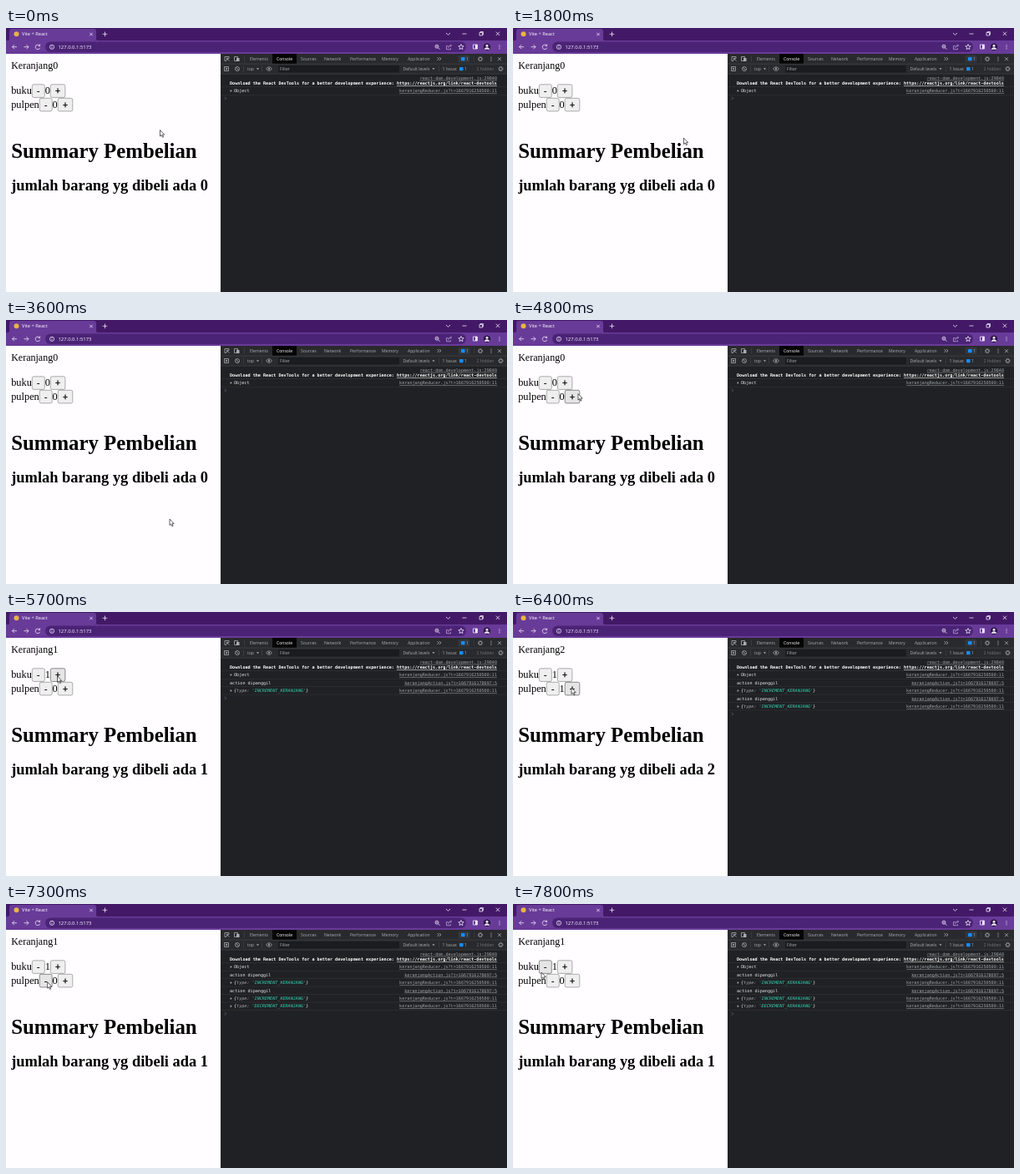
Write an HTML page that moves like this. It is 600 px wide and 317 px high and loops after 8 s.

```html
<!DOCTYPE html>
<html lang="id">
<head>
<meta charset="utf-8">
<title>Vite + React</title>
<style>
  html, body { margin: 0; width: 100%; height: 100%; overflow: hidden; }
  svg { display: block; width: 600px; height: 317px; }
  text { white-space: pre; }
  .ui { font-family: "Open Sans", sans-serif; }
  .page { font-family: "Liberation Serif", serif; fill: #000; }
  .mono { font: 5.12px "DejaVu Sans Mono", monospace; fill: #e8e9eb; }
  .mono.bold { font-weight: 700; fill: #fff; }
  .mono.link { fill: #9fa4a9; text-decoration: underline; text-anchor: end; }
  .key { fill: #a3a8ad; }
  .string { fill: #35d4b4; }
  .icon { fill: none; stroke-width: .8; }
  .button rect { fill: #efefef; stroke: #8c8c8c; stroke-width: .7; }
  .button.hover rect { fill: #e5e5e5; stroke: #5c5c5c; }
  .button text { font: 10.3px "Liberation Sans", sans-serif; text-anchor: middle; stroke: #000; stroke-width: .3; }
</style>
</head>
<body>
<svg id="stage" viewBox="0 0 600 317"></svg>
<script>
const LOOP = 8000;
const INCREMENT_BUKU = 5700, INCREMENT_PULPEN = 6400, DECREMENT_PULPEN = 7200;
const stage = document.getElementById('stage');

const rect = (x, y, w, h, fill, r = 0) =>
  `<rect x="${x}" y="${y}" width="${w}" height="${h}" rx="${r}" fill="${fill}"/>`;
const circle = (x, y, r, fill) => `<circle cx="${x}" cy="${y}" r="${r}" fill="${fill}"/>`;
const icon = (d, color) => `<path class="icon" d="${d}" stroke="${color}"/>`;
const ring = (x, y, r) => `M${x - r} ${y}a${r} ${r} 0 1 0 ${2 * r} 0a${r} ${r} 0 1 0 ${-2 * r} 0`;
const cross = (x, y, r) => `M${x - r} ${y - r}l${2 * r} ${2 * r}m0 ${-2 * r}l${-2 * r} ${2 * r}`;
const box = (x, y, w, h) => `M${x} ${y}h${w}v${h}h${-w}z`;
const label = (x, y, text, size = 5.1, fill = '#a9adb2') =>
  `<text class="ui" x="${x}" y="${y}" font-size="${size}" fill="${fill}">${text}</text>`;
const mono = (x, y, text, cls = '') => `<text class="mono ${cls}" x="${x}" y="${y}">${text}</text>`;
const page = (y, size, text, id = '', weight = 400, x = 6.2) =>
  `<text class="page" id="${id}" x="${x}" y="${y}" font-size="${size}" font-weight="${weight}">${text}</text>`;
const dots = (x, y, fill) => [-2, 0, 2].map(d => circle(x, y + d, .6, fill)).join('');
const caret = (x, y) => `<path d="M${x} ${y}h3l-1.5 2z" fill="#a9adb2"/>`;
const badge = (x, y) => rect(x, y, 4.6, 4.2, '#1a8cf0', .8);
const gear = (x, y) => icon(ring(x, y, 1.9), '#a9adb2') +
  `<circle class="icon" cx="${x}" cy="${y}" r="2.7" stroke="#a9adb2" stroke-dasharray="1 1.12"/>`;

function browserBar() {
  const pale = '#eee6f7';
  return rect(0, 0, 600, 16, '#431967') +
    `<path d="M1 15.5q3 0 3-3V4q0-3 3-3h98q3 0 3 3v8.500q0 3 3 3z" fill="#683b98"/>` +
    rect(0, 15, 600, 16, '#683b98') +
    rect(47, 16.500, 504, 12.500, '#4b2376', 6.2) +
    circle(12.5, 7.3, 3, '#e9b53c') +
    label(19, 9.4, 'Vite + React', 5.7, '#fff') +
    label(62.5, 25.2, '127.0.0.1:5173', 5.9, '#fff') +
    icon(cross(102, 7.5, 1.7) + 'M118.500 4.500v5.600m-2.800-2.800h5.600', pale) +
    icon('M527 6l2.500 2.300L532 6M546.500 7h5M568 5.500V4.500h3.500v3.500h-1' + box(567, 5.5, 3.5, 3.5) +
      cross(589, 6.8, 2.2), pale) +
    icon('M13 22.700H7.500m2.500-2.500l-2.500 2.500l2.500 2.500M21.500 22.700H27m-2.500-2.500l2.500 2.500l-2.500 2.500', pale) +
    icon('M40.300 21.200a2.800 2.800 0 1 0 .4 2.500M40.600 19.500v2h-2', pale) +
    icon(ring(55, 22.8, 2.6) + 'M55 22.500v1.700m0-3.100v.7', pale) +
    icon(ring(516, 22.2, 2) + 'M517.500 23.700l2 2M514.800 22.200h2.400', pale) +
    icon('M529.500 21.500h-2v4.200h5v-1.500M529.500 24q0-3 4-3m-1.500-1.500l1.500 1.500l-1.500 1.500', '#b7a3cd') +
    icon('M545 19.500l.9 2.100l2.300.2l-1.800 1.500l.6 2.300l-2-1.200l-2 1.200l.6-2.300l-1.800-1.500l2.300-.2z', pale) +
    icon(box(559.5, 20, 5, 5), pale) + rect(562, 20, 2.5, 5, pale) +
    circle(576, 22.8, 4.2, '#2a1244') + circle(576, 21.3, 1.5, pale) +
    `<path d="M573 25.700q0-2.500 3-2.500t3 2.500z" fill="${pale}"/>` + dots(591, 22.8, pale);
}

function devtools() {
  const grey = '#a9adb2', line = '#43464a';
  const tabs = [[292, 'Elements'], [353, 'Sources'], [381, 'Network'], [412, 'Performance'],
    [450, 'Memory'], [481, 'Application']];
  return rect(257, 31, 343, 286, '#202124') + rect(257, 31, 343, 24, '#292a2d') +
    rect(319, 31, 29, 12, '#050505') + label(324, 39.2, 'Console', 5.1, '#fff') +
    tabs.map(([x, name]) => label(x, 39.2, name)).join('') +
    rect(257, 42.8, 343, .6, line) + rect(257, 54.8, 343, .6, line) +
    icon('M264 39.500h-2v-5h5v2M264.500 36.500l3 3m-3-3v2.500m0-2.500h2.500', grey) +
    icon(box(273.5, 34.5, 4, 5), grey) + rect(276, 36, 3.5, 4, grey) +
    rect(285, 33.500, .6, 7, line) +
    icon('M516.500 35l2 2l-2 2m2.500-4l2 2l-2 2', grey) +
    rect(541.5, 32.8, 14, 8.5, '#34373b', 1.5) + badge(545, 35) + label(551, 39, '1', 5.1, '#7db7f5') +
    rect(560, 33.500, .6, 7, line) + gear(568, 37.2) + dots(581, 37.2, grey) + icon(cross(591, 37.2, 2), grey) +
    icon(box(261.5, 46.5, 5, 5), grey) + `<path d="M263.200 47.500l2.500 1.500l-2.500 1.500z" fill="${grey}"/>` +
    icon(ring(277, 49, 2.5) + 'M275.200 47.200l3.600 3.600', grey) +
    rect(284, 45.500, .6, 7, line) + label(289, 50.9, 'top') + caret(300, 48.2) +
    rect(306, 45.500, .6, 7, line) +
    icon('M311.500 49q3.500-4.500 7 0q-3.500 4.500-7 0z', grey) + circle(315, 49, 1.1, grey) +
    rect(326, 45, 145, 8.5, '#1b1c1f', .8) + label(328, 51, 'Filter') +
    label(475.500, 50.9, 'Default levels') + caret(510.5, 48.2) +
    rect(518, 45.500, .6, 7, line) + label(522.5, 50.9, '1 Issue:') + badge(543, 47) +
    label(549, 50.9, '1', 5.1, '#7db7f5') +
    label(563.5, 50.9, '2 hidden', 5.1, '#6f7378') + gear(592.5, 49);
}

const LOG_TOP = 70.9, LOG_ROW = 9.45;
const reducer = 'keranjangReducer.js?t=1667916250500:11';
const action = 'keranjangAction.js?t=1667916178697:5';
const called = 'action dipanggil';
const typed = name =>
  `<tspan font-style="italic">{<tspan class="key">type: </tspan><tspan class="string">'${name}_KERANJANG'</tspan>}</tspan>`;
const logs = [
  [0, 'Object', reducer],
  [INCREMENT_BUKU, called, action],
  [INCREMENT_BUKU, typed('INCREMENT'), reducer],
  [INCREMENT_PULPEN, called, action],
  [INCREMENT_PULPEN, typed('INCREMENT'), reducer],
  [DECREMENT_PULPEN, typed('DECREMENT'), reducer],
];

function logRow([, text, origin], i) {
  const y = LOG_TOP + i * LOG_ROW, plain = text === called;
  return `<g class="log">` + mono(plain ? 268 : 273, y + 6.3, text) +
    (plain ? '' : `<path d="M268.700 ${y + 3.2}l2 1.500l-2 1.500z" fill="#a9adb2"/>`) +
    mono(588, y + 6.3, origin, 'link') + rect(257, y + LOG_ROW - .4, 343, .5, '#34363a') + '</g>';
}

const buttons = [[30.9, 67.4, '-'], [52.9, 67.4, '+'], [39.8, 83.9, '-'], [61.8, 83.9, '+']]
  .map(([x, y, sign]) => ({ x, y, sign, w: sign === '-' ? 15.8 : 18.4, h: 16.4 }));
const drawButton = ({ x, y, w, h, sign }) =>
  `<g class="button"><rect x="${x + .4}" y="${y + .4}" width="${w - .8}" height="${h - .8}" rx="2"/>` +
  `<text x="${x + w / 2}" y="${y + 11.8}">${sign}</text></g>`;

stage.innerHTML = rect(0, 0, 600, 317, '#fffdff') + browserBar() + devtools() +
  mono(588, 61.8, 'react-dom.development.js:29840', 'link') +
  mono(268, 68, 'Download the React DevTools for a better development experience: ' +
    '<tspan text-decoration="underline">https://reactjs.org/link/react-devtools</tspan>', 'bold') +
  rect(257, 70.500, 343, .5, '#34363a') + logs.map(logRow).join('') +
  `<path id="prompt" class="icon" d="M262 3l1.700 1.700l-1.700 1.700" stroke="#5b6f8c"/>` +
  page(48.7, 12, '', 'cart') + page(79.4, 12.35, 'buku') + page(96.2, 12.35, 'pulpen') +
  page(79.4, 12.35, '', 'buku', 400, 46.7) + page(96.2, 12.35, '', 'pulpen', 400, 55.6) +
  page(155.6, 24.8, 'Summary Pembelian', '', 700) + page(195.1, 18.42, '', 'total', 700) +
  buttons.map(drawButton).join('') +
  `<path id="cursor" d="M0 0V7.500L1.700 6L2.900 8.700L4.100 8.200L2.900 5.600H5.200Z" fill="#fff" stroke="#222" stroke-width=".7"/>`;

const find = id => document.getElementById(id);
const cart = find('cart'), buku = find('buku'), pulpen = find('pulpen'), total = find('total');
const cursor = find('cursor'), promptMark = find('prompt');
const logNodes = document.querySelectorAll('.log');
const buttonNodes = document.querySelectorAll('.button');

// Each move: start, end, target x, target y
const moves = [
  [1000, 1300, 204.5, 132], [1800, 2300, 203, 240], [2400, 2600, 200, 246],
  [3000, 3100, 198, 249], [3500, 3600, 196, 239], [4000, 4100, 165, 180],
  [4500, 4800, 78, 88.5], [5000, 5300, 61.5, 77], [5800, 5900, 63, 80],
  [6100, 6300, 70, 91], [6400, 6600, 52, 93], [6700, 6800, 49.7, 93.7],
  [7500, 7600, 42, 88], [7700, 7800, 34, 82],
];

function cursorAt(time) {
  let x = 184.5, y = 122.5;
  for (const [start, end, toX, toY] of moves) {
    if (time <= start) break;
    const p = Math.min(1, (time - start) / (end - start));
    x += (toX - x) * p;
    y += (toY - y) * p;
  }
  return [x, y];
}

function render(now) {
  const time = Math.floor(now % LOOP / 100) * 100;
  const [x, y] = cursorAt(time);
  cursor.setAttribute('transform', `translate(${x} ${y})`);
  buttons.forEach((b, i) => buttonNodes[i].classList.toggle('hover',
    x >= b.x && x < b.x + b.w && y >= b.y && y < b.y + b.h));

  const books = +(time >= INCREMENT_BUKU);
  const pens = +(time >= INCREMENT_PULPEN && time < DECREMENT_PULPEN);
  buku.textContent = books;
  pulpen.textContent = pens;
  cart.textContent = `Keranjang${books + pens}`;
  total.textContent = `jumlah barang yg dibeli ada ${books + pens}`;

  let rows = 0;
  logs.forEach(([at], i) => {
    const shown = time >= at;
    logNodes[i].style.display = shown ? '' : 'none';
    rows += shown;
  });
  promptMark.setAttribute('transform', `translate(0 ${LOG_TOP + rows * LOG_ROW - .5})`);
}

const began = performance.now();
function tick() {
  render(performance.now() - began);
  requestAnimationFrame(tick);
}
tick();
</script>
</body>
</html>
```
